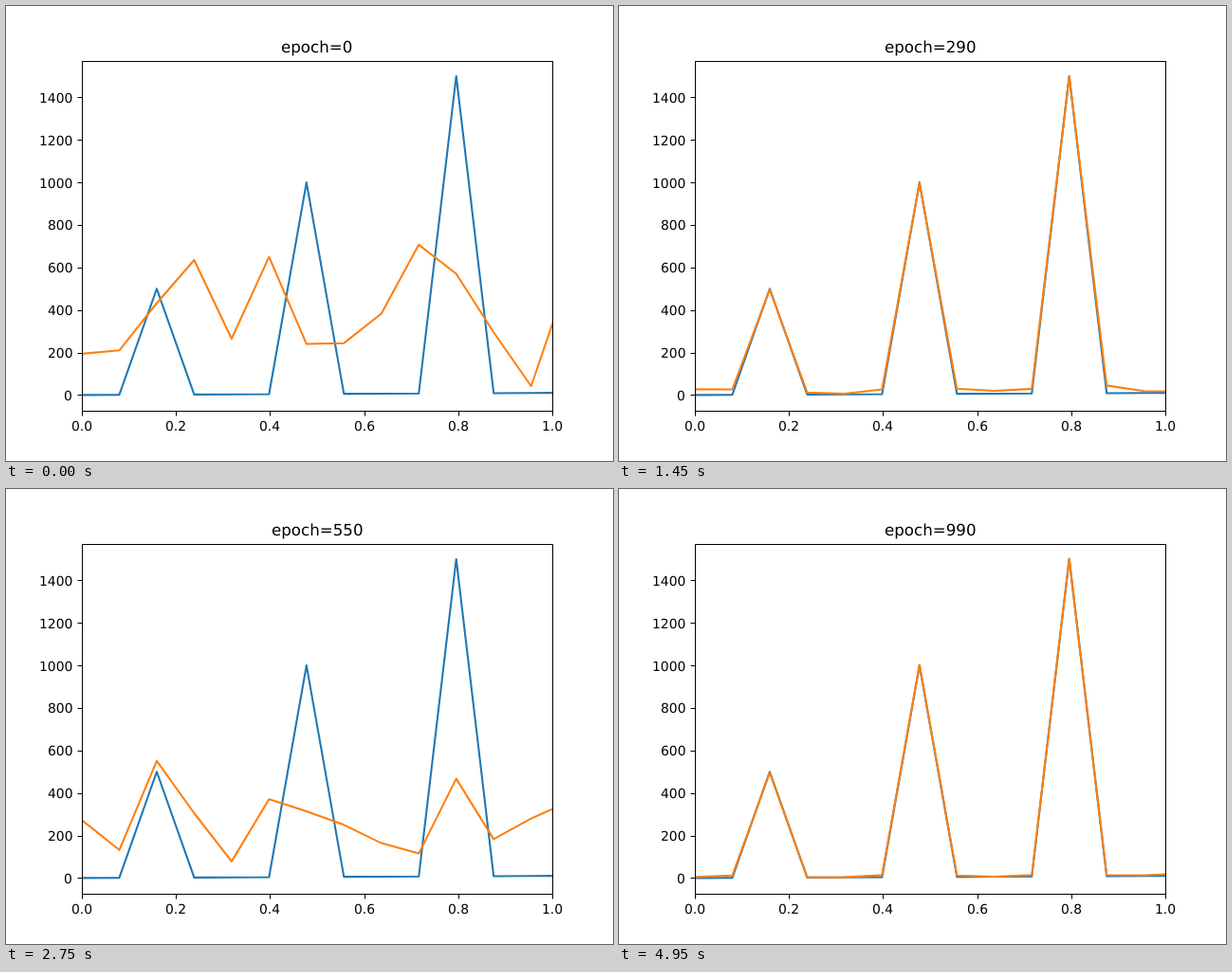
An HTML page with a canvas for the animation above (5000 ms loop, 640 by 480 pixels).

```html
<!DOCTYPE html>
<html lang="en">
<head>
<meta charset="utf-8">
<title>Curve fitting</title>
<style>
  html, body { margin: 0; width: 100%; height: 100%; overflow: hidden; background: #fff; }
  canvas { display: block; }
</style>
</head>
<body>
<canvas id="chart" width="640" height="480"></canvas>
<script>
const ctx = document.getElementById('chart').getContext('2d');
const LEFT = 80, RIGHT = 576, TOP = 57.6, BOTTOM = 427.2;
const LOOP = 5000, STEP = 50, EPOCHS_PER_STEP = 10;
const SETTLE_EPOCHS = 140;

// Untrained curves; the fit starts over from each of them.
const starts = [
  { epoch: 0, y: [194, 210, 432, 635, 265, 650, 240, 244, 383, 707, 570, 295, 42, 556] },
  { epoch: 550, y: [272, 132, 551, 305, 78, 371, 314, 250, 164, 115, 467, 183, 280, 358] }
];

// Every fourth point is a peak, each 500 higher than the last.
const isPeak = n => n % 4 === 2;
const goal = Array.from({ length: 14 }, (_, n) => isPeak(n) ? 125 * (n + 2) : n * 0.8);

const toX = x => LEFT + x * (RIGHT - LEFT);
const toY = y => 410.4 - y * 0.2243;
const crisp = v => Math.round(v) + 0.5;

function random(a, b) {
  const s = Math.sin(a * 12.9898 + b * 78.233) * 43758.5453;
  return s - Math.floor(s);
}

function fitAt(epoch) {
  const start = starts.findLast(s => s.epoch <= epoch);
  const error = Math.max(0, 1 - (epoch - start.epoch) / SETTLE_EPOCHS) ** 2;
  const spread = 50 - epoch * 0.038;
  return goal.map((y, n) => {
    const noise = (random(epoch, n) - (isPeak(n) ? 0.5 : 0)) * spread;
    return start.y[n] * error + (y + noise) * (1 - error);
  });
}

function drawCurve(values, color) {
  ctx.strokeStyle = color;
  ctx.lineWidth = 2.083;
  ctx.lineJoin = 'round';
  ctx.beginPath();
  values.forEach((v, n) => ctx.lineTo(toX(n / (4 * Math.PI)), toY(v)));
  ctx.stroke();
}

// anchor: 0.5 centres the text on x, 1 ends it there.
function drawText(text, x, y, size, anchor) {
  ctx.font = `${size}px "DejaVu Sans", sans-serif`;
  ctx.textRendering = 'geometricPrecision';
  ctx.fillText(text, Math.round(x - ctx.measureText(text).width * anchor), y);
}

function drawAxes() {
  ctx.strokeStyle = ctx.fillStyle = '#000';
  ctx.lineWidth = 1;
  ctx.lineJoin = 'miter';
  const x0 = crisp(LEFT), y0 = crisp(TOP), y1 = crisp(BOTTOM);
  ctx.strokeRect(x0, y0, crisp(RIGHT) - x0, y1 - y0);
  ctx.beginPath();
  for (let i = 0; i <= 5; i++) {
    const x = toX(i / 5);
    ctx.moveTo(crisp(x), y1);
    ctx.lineTo(crisp(x), y1 + 5);
    drawText((i / 5).toFixed(1), x, 448, 13.89, 0.5);
  }
  for (let v = 0; v <= 1400; v += 200) {
    const y = toY(v);
    ctx.moveTo(x0, crisp(y));
    ctx.lineTo(x0 - 5, crisp(y));
    drawText(v, 70.3, Math.ceil(y + 5), 13.89, 1);
  }
  ctx.stroke();
}

function draw() {
  const epoch = Math.floor(performance.now() % LOOP / STEP) * EPOCHS_PER_STEP;
  ctx.fillStyle = '#fff';
  ctx.fillRect(0, 0, 640, 480);
  ctx.save();
  ctx.beginPath();
  ctx.rect(LEFT, TOP, RIGHT - LEFT, BOTTOM - TOP);
  ctx.clip();
  drawCurve(goal, '#1f77b4');
  drawCurve(fitAt(epoch), '#ff7f0e');
  ctx.restore();
  drawAxes();
  drawText(`epoch=${epoch}`, 328, 49, 16.67, 0.5);
  requestAnimationFrame(draw);
}
draw();
</script>
</body>
</html>
```
